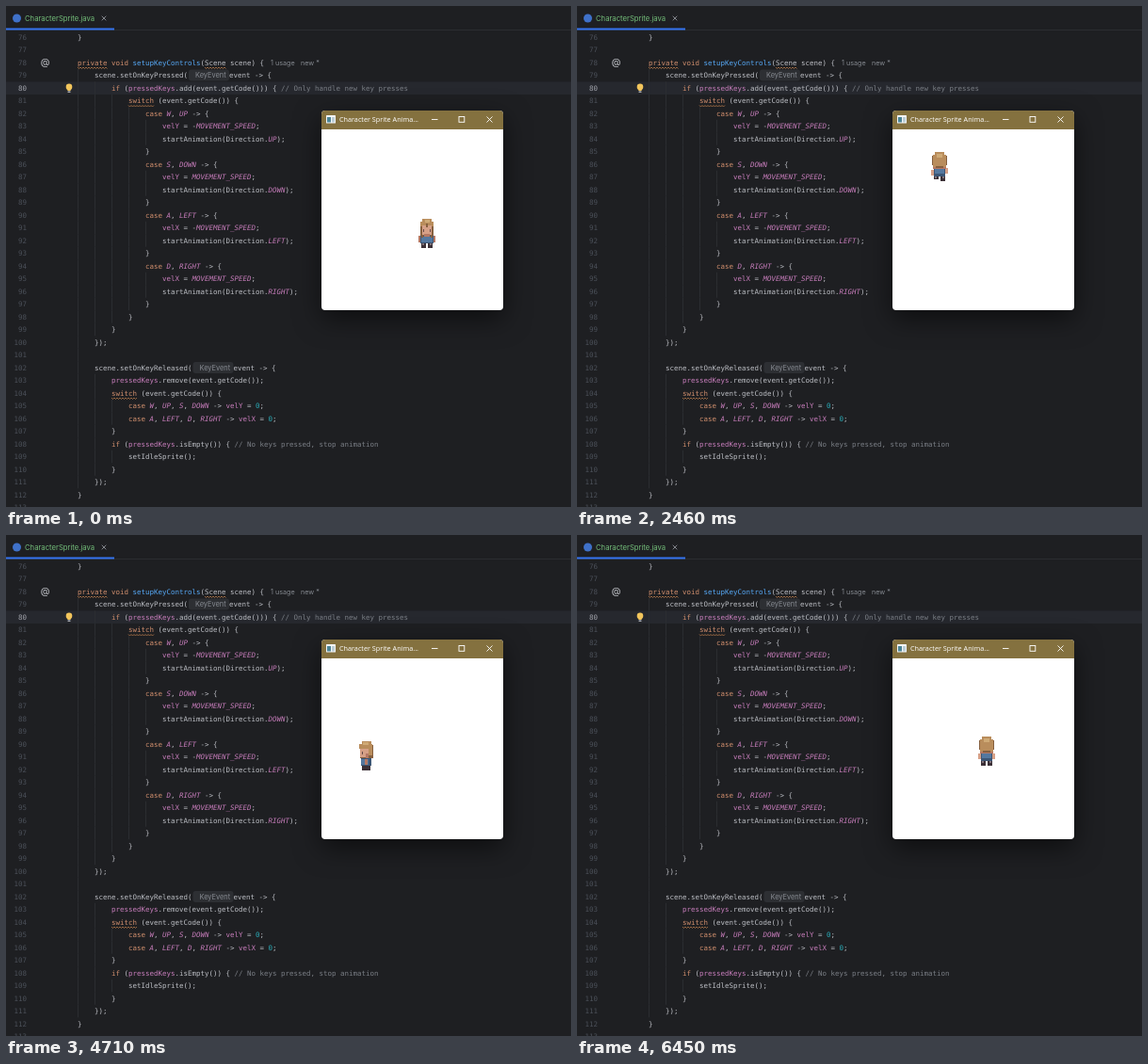
An HTML page with a canvas that plays this animation: 600 by 532 pixels, repeating every 6.48 s.

```html
<!DOCTYPE html>
<html lang="en">
<head>
<meta charset="utf-8">
<title>Sprite walk</title>
<style>
html, body { margin: 0; width: 600px; height: 532px; overflow: hidden; background: #1e1f22; }
canvas { display: block; }
</style>
</head>
<body>
<canvas id="stage" width="600" height="532"></canvas>
<script>
const W = 600, H = 532, LOOP = 6480, STEP = 30;
const CHAR = 4.5, LINE = 13.5, LEFT = 58, FIRST = 76;
const MONO = '7.475px "DejaVu Sans Mono", "Noto Sans Mono", monospace';
const ui = size => `${size}px Inter, Roboto, sans-serif`;
const lineY = n => 33 + (n - FIRST) * LINE;

// A tab marks the place of the KeyEvent inlay hint.
const code = `    }

    private void setupKeyControls(Scene scene) {
        scene.setOnKeyPressed(\tevent -> {
            if (pressedKeys.add(event.getCode())) { // Only handle new key presses
                switch (event.getCode()) {
                    case W, UP -> {
                        velY = -MOVEMENT_SPEED;
                        startAnimation(Direction.UP);
                    }
                    case S, DOWN -> {
                        velY = MOVEMENT_SPEED;
                        startAnimation(Direction.DOWN);
                    }
                    case A, LEFT -> {
                        velX = -MOVEMENT_SPEED;
                        startAnimation(Direction.LEFT);
                    }
                    case D, RIGHT -> {
                        velX = MOVEMENT_SPEED;
                        startAnimation(Direction.RIGHT);
                    }
                }
            }
        });

        scene.setOnKeyReleased(\tevent -> {
            pressedKeys.remove(event.getCode());
            switch (event.getCode()) {
                case W, UP, S, DOWN -> velY = 0;
                case A, LEFT, D, RIGHT -> velX = 0;
            }
            if (pressedKeys.isEmpty()) { // No keys pressed, stop animation
                setIdleSprite();
            }
        });
    }
`.split('\n');

const rules = [
  [/^\/\/.*/, '#7a7e85'],
  [/^(private|void|if|switch|case)\b/, '#cf8e6d'],
  [/^setupKeyControls/, '#56a8f5'],
  [/^(pressedKeys|vel[XY])\b/, '#c77dbb'],
  [/^(MOVEMENT_SPEED|UP|DOWN|LEFT|RIGHT|[WASD])\b/, '#c77dbb', 'italic '],
  [/^\d+/, '#2aacb8'],
  [/^(\w+|[^\w\s]+?(?=\/\/|\w|\s|$)|\s+)/, '#bcbec4']
];

const stage = document.getElementById('stage').getContext('2d');
const still = document.createElement('canvas');
still.width = W;
still.height = H;
const g = still.getContext('2d');

function label(str, x, y, font, color, align = 'left') {
  g.font = font;
  g.fillStyle = color;
  g.textAlign = align;
  g.fillText(str, x, y);
}

function box(x, y, w, h, r, color) {
  g.fillStyle = color;
  g.beginPath();
  g.roundRect(x, y, w, h, r);
  g.fill();
}

function stroke(color, width, ...paths) {
  g.strokeStyle = color;
  g.lineWidth = width;
  g.beginPath();
  for (const path of paths) path.forEach(([x, y], i) => i ? g.lineTo(x, y) : g.moveTo(x, y));
  g.stroke();
}

function cross(x, y, r, color, width) {
  stroke(color, width, [[x - r, y - r], [x + r, y + r]], [[x + r, y - r], [x - r, y + r]]);
}

function wave(x, n, chars) {
  const y = lineY(n) + 5.5, points = [];
  for (let i = 0; i <= chars * CHAR; i += 1.5) points.push([x + i, y + (i / 1.5 % 2 ? 1 : -0.5)]);
  stroke('#b87a4b', 0.8, points);
}

function codeLine(text, n) {
  const base = lineY(n) + 2.7;
  let x = LEFT, rest = text;
  while (rest) {
    if (rest[0] === '\t') {
      box(x + 1, lineY(n) - 6, 43, 12, 3, '#2d2f33');
      label('KeyEvent', x + 8, base, ui(7.4), '#868a91');
      x += 44;
      rest = rest.slice(1);
      continue;
    }
    const [re, color, style = ''] = rules.find(r => r[0].test(rest));
    const word = rest.match(re)[0];
    label(word, x, base, style + MONO, color);
    x += word.length * CHAR;
    rest = rest.slice(word.length);
  }
}

function drawEditor() {
  g.fillStyle = '#1e1f22';
  g.fillRect(0, 0, W, H);
  g.fillStyle = '#26282e';
  g.fillRect(0, lineY(80) - 6.5, W, LINE);

  code.forEach((text, i) => {
    const n = FIRST + i;
    const lead = (text || code[i + 1] || '').search(/\S/);
    for (let c = 4; c < lead; c += 4) {
      g.fillStyle = '#2b2d31';
      g.fillRect(Math.round(LEFT + c * CHAR), lineY(n) - LINE / 2, 1, LINE);
    }
    label(n, 22, lineY(n) + 2.7, MONO, n === 80 ? '#a1a3ab' : '#4b5059', 'right');
    codeLine(text, n);
  });

  label('1 usage', 281, lineY(78) + 2.7, ui(7.2), '#868a91');
  label('new *', 313, lineY(78) + 2.7, ui(7.2), '#868a91');
  wave(76, 78, 7);
  wave(211, 78, 5);
  wave(130, 81, 6);
  wave(112, 104, 6);

  label('@', 41.5, 63, ui(10), '#ced0d6', 'center');
  box(63.7, 82.5, 6.6, 6.8, 3.3, '#f2c55c');
  box(65.3, 88, 3.4, 2, 0, '#f2c55c');
  box(65.5, 90.6, 3, 1.2, 0.5, '#ced0d6');

  // Tab bar
  g.fillStyle = '#2b2d31';
  g.fillRect(0, 25, W, 1);
  g.fillStyle = '#3574f0';
  g.fillRect(0, 23.5, 115, 2);
  box(7, 8.5, 9, 9, 4.5, '#3f71c9');
  label('CharacterSprite.java', 20, 16, ui(7.7), '#73bd79');
  cross(104, 13, 2.3, '#9da0a8', 0.8);
}

function drawWindow() {
  g.save();
  g.shadowColor = 'rgba(0,0,0,.55)';
  g.shadowBlur = 28;
  g.shadowOffsetY = 9;
  box(335, 111, 193, 212, 4, '#fff');
  g.restore();
  box(335, 111, 193, 20, [4, 4, 0, 0], '#84713f');
  box(340, 116, 10, 8.5, 0.5, '#f3f5f7');
  box(341, 118, 4, 5.5, 0, '#4a8394');
  box(346, 118, 3, 5.5, 0, '#bccdd5');
  label('Character Sprite Anima...', 354, 123.3, '7.25px "Open Sans", "Noto Sans", sans-serif', '#fff');
  stroke('#fff', 0.9, [[452, 120.5], [458.5, 120.5]]);
  g.strokeRect(481, 117.5, 5.8, 5.8);
  cross(513.5, 120.5, 3, '#fff', 0.9);
}

// Time, x, y and facing held on the way to that point.
const route = [
  [0, 447, 242, 'down'], [920, 447, 242, 'down'], [1020, 437, 242, 'left'],
  [1400, 410, 242, 'left'], [1450, 410, 242, 'left'], [2010, 410, 180, 'up'],
  [2300, 385, 180, 'left'], [2370, 385, 180, 'left'], [2460, 385, 171, 'up'],
  [2520, 385, 171, 'up'], [3230, 460, 171, 'right'], [3260, 460, 171, 'right'],
  [3360, 460, 181, 'down'], [3930, 460, 235, 'down'], [3960, 460, 235, 'down'],
  [4710, 382, 235, 'left'], [4740, 382, 235, 'left'], [5000, 382, 265, 'down'],
  [5280, 411, 265, 'right'], [5520, 411, 265, 'down'], [5730, 434, 265, 'right'],
  [6120, 434, 265, 'right'], [6450, 434.5, 230, 'up'], [LOOP, 434.5, 230, 'up']
];

function pose(t) {
  const i = Math.max(1, route.findIndex(p => p[0] >= t));
  const [t0, x0, y0] = route[i - 1], [t1, x1, y1, dir] = route[i];
  const k = (t - t0) / (t1 - t0);
  const moving = x0 !== x1 || y0 !== y1;
  const step = moving ? [1, 0, -1, 0][Math.floor(t / 120) % 4] : 0;
  return { x: x0 + (x1 - x0) * k, y: y0 + (y1 - y0) * k, dir, step };
}

const HAIR = '#b98d5c', LIGHT = '#cfaa76', BROWN = '#86603f', SKIN = '#d6a087',
  SHADE = '#b47864', BLUE = '#54789f', NAVY = '#3c5675', BOOT = '#3b3036';

const rect = (color, x, y, w, h) => {
  stage.fillStyle = color;
  stage.fillRect(x, y, w, h);
};

function boots(step) {
  rect(BOOT, -6, 9, 5, 6 - Math.max(0, step) * 2);
  rect(BOOT, 1, 9, 5, 6 + Math.min(0, step) * 2);
  rect('#80727a', -5, 10, 2, 2);
  rect('#80727a', 3, 10, 2, 2);
}

function front(step) {
  boots(step);
  rect(SHADE, -9, 2 + step, 3, 7);
  rect(SHADE, 6, 2 - step, 3, 7);
  rect(NAVY, -7, 1, 14, 9);
  rect(BLUE, -6, 3, 12, 6);
  rect(BROWN, -7, -12, 14, 14);
  rect(HAIR, -5, -16, 10, 3);
  rect(HAIR, -7, -13, 14, 5);
  rect(LIGHT, -2, -15, 5, 3);
  rect(SKIN, -5, -9, 10, 10);
  rect(BROWN, -1, -11, 2, 4);
  rect('#664b48', -4, -5, 1, 3);
  rect('#664b48', 3, -5, 1, 3);
  rect(SHADE, -3, 0, 6, 3);
  rect(BROWN, -6, 1, 2, 3);
  rect(BROWN, 4, 1, 2, 3);
}

function back(step) {
  boots(step);
  rect(SKIN, -9, 2 + step, 3, 6);
  rect(SKIN, 6, 2 - step, 3, 6);
  rect(NAVY, -6, 1, 12, 9);
  rect(BLUE, -5, 2, 10, 5);
  rect(SHADE, -7, -4, 14, 6);
  rect(BROWN, -8, -12, 16, 10);
  rect(HAIR, -5, -16, 10, 3);
  rect(HAIR, -7, -13, 14, 13);
  rect(LIGHT, -3, -14, 6, 4);
  rect(BROWN, -4, -1, 8, 2);
}

function side(step) {
  rect(BOOT, -4 - step * 2, 9, 5, 6);
  rect(BOOT, step * 2, 9, 5, 6);
  rect(NAVY, -5, 1, 11, 9);
  rect(BLUE, -5, 3, 8, 6);
  if (step) rect(SKIN, -9, 3, 4, 3);
  rect(SHADE, step * 4 - 1, 3, 3, 6);
  rect(BROWN, -6, -12, 14, 14);
  rect(HAIR, -4, -16, 10, 3);
  rect(HAIR, -7, -13, 14, 5);
  rect(LIGHT, -3, -15, 6, 3);
  rect(SKIN, -6, -8, 9, 9);
  rect('#664b48', -4, -5, 1, 3);
  rect(SHADE, 0, -3, 3, 5);
  rect(HAIR, 3, -9, 4, 8);
}

function drawSprite({ x, y, dir, step }) {
  stage.save();
  stage.translate(Math.round(x), Math.round(y));
  if (dir === 'right') stage.scale(-1, 1);
  (dir === 'down' ? front : dir === 'up' ? back : side)(step);
  stage.restore();
}

function frame(now) {
  const t = Math.floor((now - start) % LOOP / STEP) * STEP;
  stage.drawImage(still, 0, 0);
  drawSprite(pose(Math.max(0, t)));
  requestAnimationFrame(frame);
}

drawEditor();
drawWindow();
const start = performance.now();
frame(start);
</script>
</body>
</html>
```
